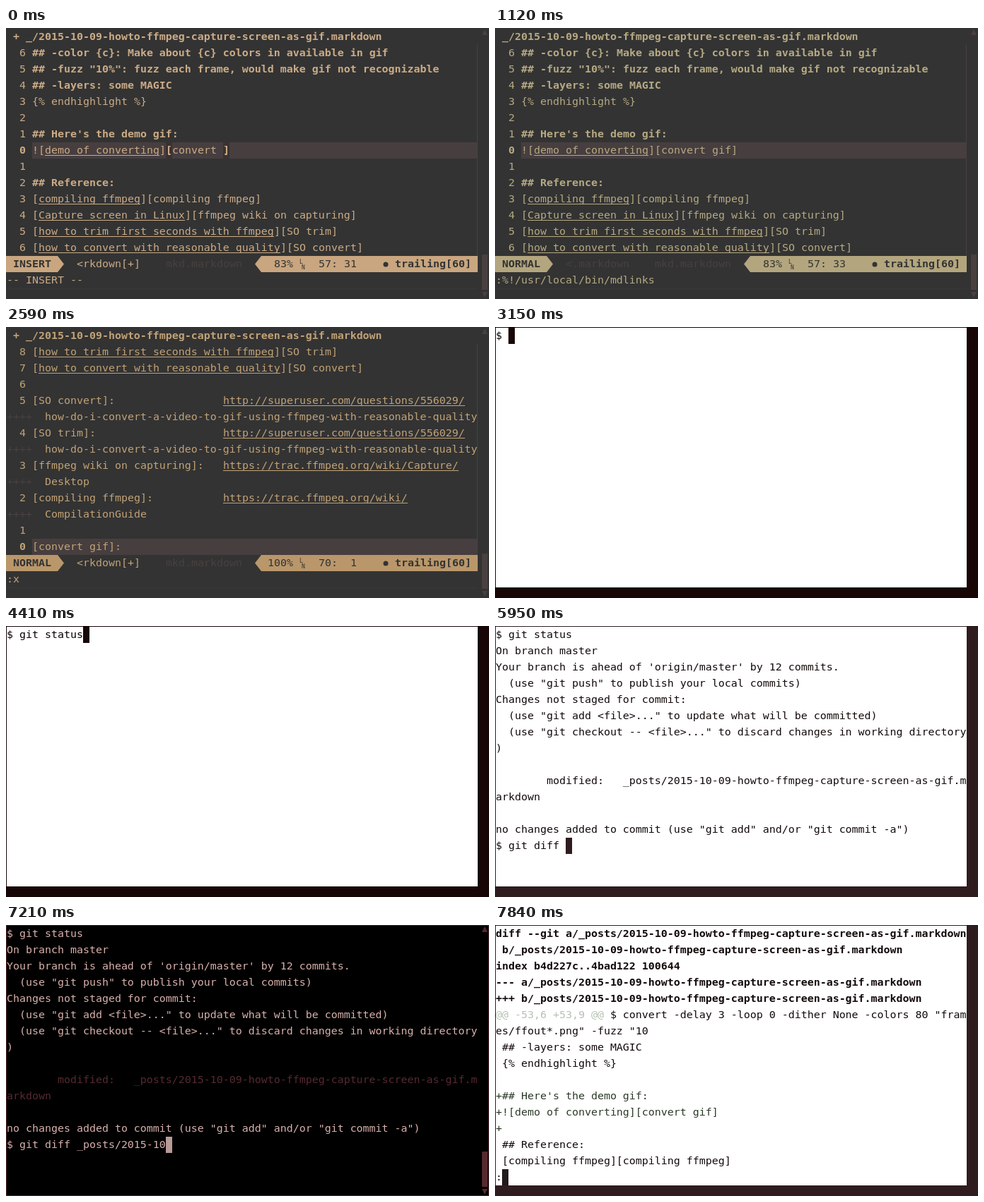
Write an HTML page with a canvas that moves like this. It is 683 px wide and 384 px high and loops after 8 s.

```html
<!DOCTYPE html>
<html lang="en">
<head>
<meta charset="utf-8">
<title>Terminal session</title>
<style>
  html, body { margin: 0; width: 100%; height: 100%; overflow: hidden; background: #333; }
  canvas { display: block; }
</style>
</head>
<body>
<canvas id="stage" width="683" height="384"></canvas>
<script>
const ctx = document.getElementById('stage').getContext('2d');
const LOOP = 8000, CW = 9, RH = 23;
const FACE = '14.95px "DejaVu Sans Mono", monospace';
const FILE = '2015-10-09-howto-ffmpeg-capture-screen-as-gif.markdown';
const POST = '_posts/' + FILE;

const px = col => 1 + col * CW;
const py = row => 1 + row * RH;

function box(x, y, w, h, color) {
  ctx.fillStyle = color;
  ctx.fillRect(x, y, w, h);
}

function poly(color, ...pts) {
  ctx.fillStyle = color;
  ctx.beginPath();
  pts.forEach(([x, y]) => ctx.lineTo(x, y));
  ctx.fill();
}

function put(row, col, text, color, bold) {
  ctx.font = (bold ? 'bold ' : '') + FACE;
  ctx.fillStyle = color;
  ctx.fillText(text, px(col), py(row) + 16);
}

function underlined(row, col, text, color) {
  put(row, col, text, color);
  box(px(col), py(row) + 18, text.length * CW, 1, color);
}

function link(row, col, label, ref, color) {
  put(row, col, '[', color);
  underlined(row, col + 1, label, color);
  put(row, col + 1 + label.length, `][${ref}]`, color);
}

function cursor(row, col, color) {
  box(px(col), py(row), CW, RH, color);
}

// Latest value in a list of [time, value]
function at(t, steps) {
  let value = steps[0][1];
  for (const [time, v] of steps) if (t >= time) value = v;
  return value;
}

// Steps for typing text one key at a time, after a fixed prefix
function keys(start, gap, prefix, text) {
  return [...text].map((_, i) => [start + i * gap, prefix + text.slice(0, i + 1)]);
}

function scrollbar(color) {
  box(673, 321, 8, 50, color);
  poly(color, [677, 2], [681, 10], [673, 10]);
  poly(color, [673, 374], [681, 374], [677, 382]);
}

/* ---------- editor ---------- */

const BG = '#333333', DIM = '#4a4040', LINE = '#473e3f';

function statusLine(s, fg, seg) {
  box(0, 323, 73, 23, seg);
  poly(seg, [73, 323], [82, 334.5], [73, 346]);
  put(14, 1, s.mode, BG, true);
  put(14, 11, s.dirty ? '<rkdown[+]' : '<.markdown', s.dirty ? fg : DIM);
  put(14, 25, 'mkd.markdown', DIM);
  box(361, 323, 306, 23, seg);
  poly(seg, [361, 323], [352, 334.5], [361, 346]);
  put(14, 45 - s.percent.length, s.percent, BG);
  ctx.font = '8px "DejaVu Sans Mono", monospace';
  ctx.fillText('L', 415, 334);
  ctx.fillText('N', 418, 342);
  put(14, 49, s.pos, BG);
  ctx.beginPath();
  ctx.arc(537, 335, 3.5, 0, 7);
  ctx.fill();
  put(14, 61, 'trailing[60]', BG, true);
}

function editingView(fg, typed, insert) {
  const heads = {
    1: '## -color {c}: Make about {c} colors in available in gif',
    2: '## -fuzz "10%": fuzz each frame, would make gif not recognizable',
    3: '## -layers: some MAGIC',
    6: "## Here's the demo gif:",
    9: '## Reference:'
  };
  for (const row in heads) put(+row, 4, heads[row], fg, true);
  put(4, 4, '{% endhighlight %}', fg);
  const end = 26 + 'convert '.length + typed.length;
  if (insert) {
    cursor(7, 25, '#3a3233');
    cursor(7, end, '#3a3233');
  }
  put(7, 4, '!', fg);
  link(7, 5, 'demo of converting', 'convert ' + typed, fg);
  if (insert) {
    put(7, 25, '[', fg, true);
    put(7, end, ']', fg, true);
  }
  link(10, 4, 'compiling ffmpeg', 'compiling ffmpeg', fg);
  link(11, 4, 'Capture screen in Linux', 'ffmpeg wiki on capturing', fg);
  link(12, 4, 'how to trim first seconds with ffmpeg', 'SO trim', fg);
  link(13, 4, 'how to convert with reasonable quality', 'SO convert', fg);
}

function endView(fg) {
  link(1, 4, 'how to trim first seconds with ffmpeg', 'SO trim', fg);
  link(2, 4, 'how to convert with reasonable quality', 'SO convert', fg);
  const question = 'http://superuser.com/questions/556029/';
  const slug = 'how-do-i-convert-a-video-to-gif-using-ffmpeg-with-reasonable-quality';
  const wiki = 'https://trac.ffmpeg.org/wiki/';
  [
    ['SO convert', question, slug],
    ['SO trim', question, slug],
    ['ffmpeg wiki on capturing', wiki + 'Capture/', 'Desktop'],
    ['compiling ffmpeg', wiki, 'CompilationGuide']
  ].forEach(([name, url, rest], i) => {
    const row = 4 + 2 * i;
    put(row, 4, `[${name}]:`, fg);
    underlined(row, 34, url, fg);
    put(row + 1, 0, '++++', DIM);
    put(row + 1, 6, rest, fg);
  });
  put(13, 4, '[convert gif]:', fg);
}

function editor(t) {
  const [fg, seg] = at(t, [
    [0, ['#cbab86', '#c9a67f']],
    [630, ['#b6a983', '#b3a67e']],
    [2380, ['#c1a277', '#b9976b']]
  ]);
  const insert = t < 490, atEnd = t >= 1750;
  const dirty = t < 770 || t >= 1400;
  const typed = at(t, [[0, ''], [140, 'g'], [210, 'gi'], [350, 'gif']]);
  const command = at(t, [
    [0, '-- INSERT --'], [490, ''], [630, ':'], [700, ':w'], [770, ''],
    [1120, ':%!/usr/local/bin/mdlinks'], [1400, ''], [2380, ':'], [2450, ':x']
  ]);
  const here = atEnd ? 13 : 7;

  box(0, 0, 683, 384, BG);
  box(666, 24, 1, 299, DIM);
  box(0, 369, 667, 1, '#3b3636');
  scrollbar(DIM);
  box(px(4), py(here), 630, RH, LINE);
  put(0, 1, (dirty ? '+ ' : '') + '_/' + FILE, fg, true);

  const numbered = atEnd ? [1, 2, 3, 4, 6, 8, 10, 12, 13]
                         : [1, 2, 3, 4, 5, 6, 7, 8, 9, 10, 11, 12, 13];
  numbered.forEach((row, i) => {
    const n = atEnd ? numbered.length - 1 - i : Math.abs(row - here);
    put(row, 2, String(n), fg, n === 0);
  });

  if (atEnd) endView(fg);
  else editingView(fg, typed, insert);

  statusLine({
    mode: insert ? 'INSERT' : 'NORMAL',
    dirty,
    percent: atEnd ? '100%' : '83%',
    pos: atEnd ? '70:  1' : '57: ' + (insert ? 31 + typed.length : 33)
  }, fg, seg);
  put(15, 0, command, fg);
}

/* ---------- shell ---------- */

const STATUS_OUT = [
  'On branch master',
  "Your branch is ahead of 'origin/master' by 12 commits.",
  '  (use "git push" to publish your local commits)',
  'Changes not staged for commit:',
  '  (use "git add <file>..." to update what will be committed)',
  '  (use "git checkout -- <file>..." to discard changes in working directory',
  ')',
  '',
  '        modified:   ' + POST.slice(0, -7),
  'arkdown',
  '',
  'no changes added to commit (use "git add" and/or "git commit -a")'
];

const DIFF_OUT = [
  'diff --git a/' + POST,
  ' b/' + POST,
  'index b4d227c..4bad122 100644',
  '--- a/' + POST,
  '+++ b/' + POST,
  '                  $ convert -delay 3 -loop 0 -dither None -colors 80 "fram',
  'es/ffout*.png" -fuzz "10',
  ' ## -layers: some MAGIC',
  ' {% endhighlight %}',
  '',
  "+## Here's the demo gif:",
  '+![demo of converting][convert gif]',
  '+',
  ' ## Reference:',
  ' [compiling ffmpeg][compiling ffmpeg]',
  ':'
];

const STATUS_KEYS = [
  [0, ''], ...keys(3570, 70, '', 'git st'), ...keys(4200, 70, 'git st', 'atus')
];
const DIFF_KEYS = [
  [0, ''], ...keys(5320, 70, '', 'git diff '), ...keys(6230, 70, 'git diff ', '_p'),
  [6440, 'git diff _posts/'], ...keys(6650, 70, 'git diff _posts/', '2015-10'),
  [7350, 'git diff _posts/2015-10-09'], [7420, 'git diff ' + POST]
];

function prompt(row, text, fg, block) {
  put(row, 0, '$ ' + text, fg);
  cursor(row, 2 + text.length, block);
}

function shell(t) {
  const flash = t >= 7140 && t < 7280;  // visual bell
  const early = t < 4480;
  const edge = flash ? '#4a2429' : early ? '#180505' : '#2f1c1f';
  const fg = flash ? '#d8b1ac' : early ? '#080000' : '#140a0a';
  box(0, 0, 683, 384, edge);
  if (flash) {
    box(1, 1, 681, 382, '#000');
    scrollbar('#552a30');
  } else {
    box(1, 1, 666, 368, '#fff');
  }

  if (early) {
    prompt(0, at(t, STATUS_KEYS), fg, edge);
  } else if (t < 7560) {
    put(0, 0, '$ git status', fg);
    STATUS_OUT.forEach((line, i) => {
      const changed = i === 8 || i === 9;
      put(i + 1, 0, line, flash && changed ? '#552a30' : fg);
    });
    prompt(13, at(t, DIFF_KEYS), fg, flash ? '#b89a97' : edge);
  } else {
    DIFF_OUT.forEach((line, i) => {
      const added = i > 9 && i < 13;
      put(i, 0, line, added ? '#2b3a28' : fg, i < 5);
    });
    put(5, 0, '@@ -53,6 +53,9 @@', '#b4c2b0');
    cursor(15, 1, '#221a1c');
  }
}

function frame() {
  const t = performance.now() % LOOP;
  (t < 2730 ? editor : shell)(t);
  requestAnimationFrame(frame);
}
frame();
</script>
</body>
</html>
```
